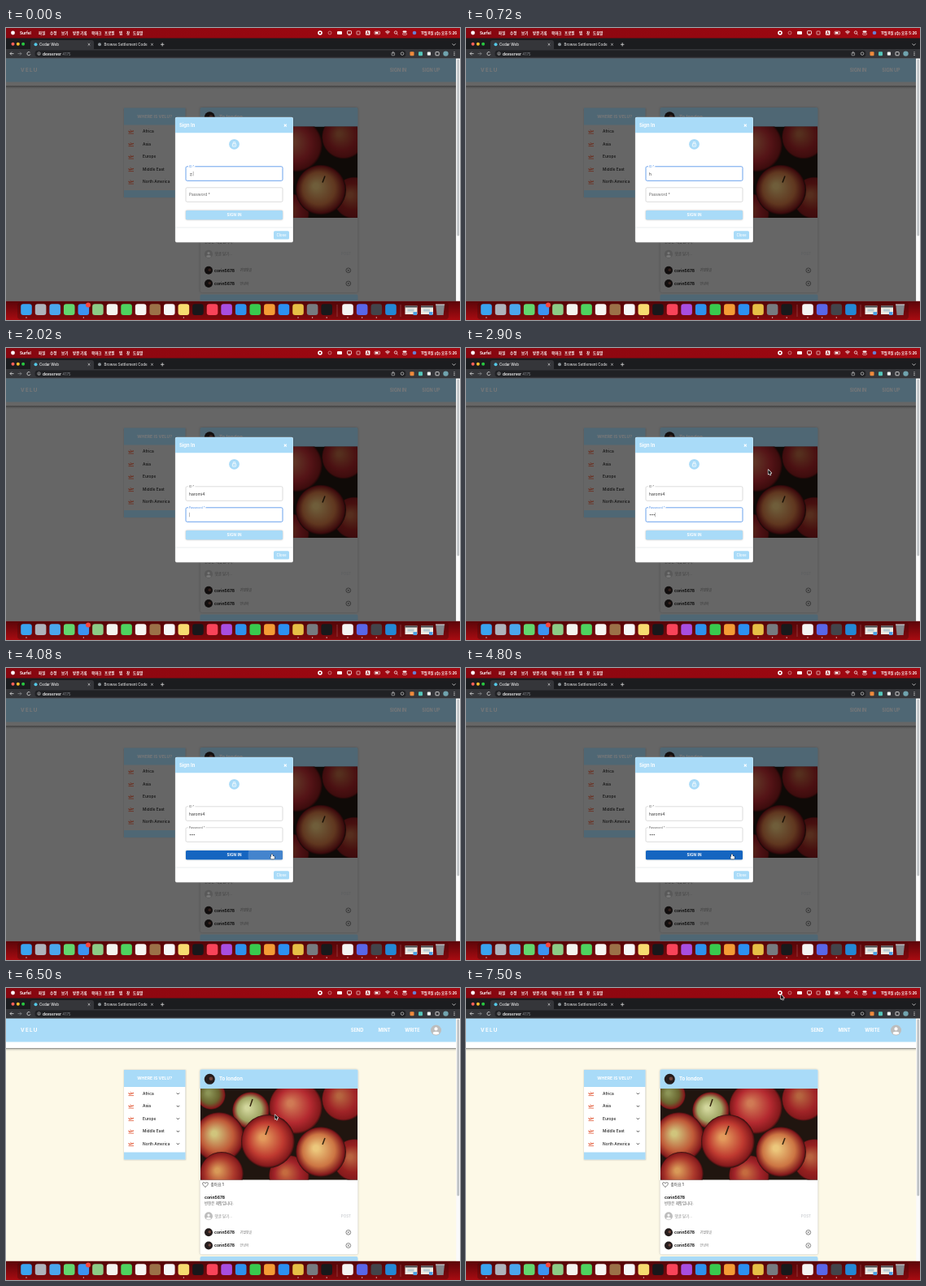
An HTML page with a canvas for the animation above (7.52 s loop, 558x360 px).

```html
<!DOCTYPE html>
<html lang="ko">
<head>
<meta charset="utf-8">
<title>Sign in</title>
<style>
html, body { margin: 0; width: 100%; height: 100%; overflow: hidden; background: #202124; }
canvas { display: block; width: 558px; height: 360px; }
</style>
</head>
<body>
<canvas id="stage"></canvas>
<script>
const W = 558, H = 360, LOOP = 7520;
const canvas = document.getElementById('stage');
const c = canvas.getContext('2d');
const scale = window.devicePixelRatio || 1;
canvas.width = W * scale;
canvas.height = H * scale;

const SKY = '#a9dbf8', FOCUS = '#5b98ea', INK = '#222';
const FONT = 'Inter, Roboto, "Noto Sans CJK KR", "Noto Sans CJK", sans-serif';
const LOGIN = 4960;
const USER = 'haromi4';
const USER_KEYS = [620, 860, 1000, 1150, 1300, 1450, 1680];
const PASS_KEYS = [2250, 2430, 2600, 2760];
const TAB_AT = 1860, CLICK = 3940;

// time, x, y
const PATH = [
  [2800, 372, 150], [2980, 371, 150], [3680, 327, 230], [4900, 327, 230],
  [5400, 306, 220], [6100, 306, 220], [7200, 387, 8], [LOOP, 387, 8]
];

const clamp = v => Math.max(0, Math.min(1, v));
const ease = v => { v = clamp(v); return v * v * (3 - 2 * v); };
const mix = (a, b, k) => `rgb(${a.map((v, i) => Math.round(v + (b[i] - v) * k))})`;

function rect(x, y, w, h, fill) {
  c.fillStyle = fill;
  c.fillRect(x, y, w, h);
}
function round(x, y, w, h, r, fill, stroke, lw = 0.6) {
  c.beginPath();
  c.roundRect(x, y, w, h, r);
  if (fill) { c.fillStyle = fill; c.fill(); }
  if (stroke) { c.strokeStyle = stroke; c.lineWidth = lw; c.stroke(); }
}
function disc(x, y, r, fill, stroke, lw = 0.7) {
  c.beginPath();
  c.arc(x, y, r, 0, 7);
  if (fill) { c.fillStyle = fill; c.fill(); }
  if (stroke) { c.strokeStyle = stroke; c.lineWidth = lw; c.stroke(); }
}
function line(color, lw, ...pts) {
  c.beginPath();
  for (let i = 0; i < pts.length; i += 2) c.lineTo(pts[i], pts[i + 1]);
  c.strokeStyle = color;
  c.lineWidth = lw;
  c.stroke();
}
function fade(x0, y0, x1, y1, ...colors) {
  const g = c.createLinearGradient(x0, y0, x1, y1);
  colors.forEach((f, i) => g.addColorStop(i / (colors.length - 1), f));
  return g;
}
function text(s, x, y, size, color, weight = 400, align = 'left', gap = 0) {
  c.font = `${weight} ${size}px ${FONT}`;
  c.letterSpacing = gap + 'px';
  c.textAlign = align;
  c.textBaseline = 'middle';
  c.fillStyle = color;
  c.fillText(s, x, y + 0.3);
}
function cross(x, y, r, color, lw = 0.7) {
  line(color, lw, x - r, y - r, x + r, y + r);
  line(color, lw, x + r, y - r, x - r, y + r);
}
function shadow(blur, color) {
  c.shadowBlur = blur * scale;
  c.shadowColor = color;
}
const noShadow = () => shadow(0, 'transparent');

function menuBar() {
  rect(0, 0, W, 13, fade(0, 0, W, 0, '#860710', '#a30811'));
  disc(8.5, 6, 2.4, '#fff');
  text('Surfel', 17, 6, 4.7, '#fff', 700);
  const items = [['파일', 40], ['수정', 54], ['보기', 68], ['방문 기록', 82], ['북마크', 105],
    ['프로필', 121], ['탭', 139], ['창', 148], ['도움말', 156]];
  for (const [s, x] of items) text(s, x, 6, 4.5, '#fff', 700);
  disc(386, 6, 2.8, '#fff');
  rect(385, 5, 2, 2, '#9a0811');
  disc(398, 6, 2, null, '#d9a0a0');
  round(407, 4, 6, 4, 1, '#fff');
  round(419.5, 3.6, 5, 4, 0.6, null, '#fff', 0.8);
  line('#fff', 0.8, 420.5, 8.8, 423.5, 8.8);
  round(431, 4, 4, 4, 0.6, null, '#fff');
  round(442, 3.3, 5.4, 5.4, 1, '#fff');
  text('A', 444.7, 6, 4.3, '#9a0811', 700, 'center');
  round(453, 4.2, 6.5, 3.6, 0.8, null, '#fff');
  rect(454, 5, 3.5, 2, '#fff');
  for (const r of [1.3, 2.8, 4.2]) {
    c.beginPath();
    c.arc(469, 8, r, -2.3, -0.85);
    c.strokeStyle = '#fff';
    c.lineWidth = 0.8;
    c.stroke();
  }
  disc(479, 5.5, 1.7, null, '#fff');
  line('#fff', 0.8, 480.2, 6.8, 481.6, 8.2);
  round(487.5, 3.6, 5, 2, 1, '#fff');
  round(487.5, 6.4, 5, 2, 1, null, '#fff');
  disc(502, 6, 2.3, '#6a7fd0');
  text('11월 8일 (수) 오후 5:26', 554, 6, 4.4, '#fff', 700, 'right');
}

function browser() {
  rect(0, 12.5, W, 14, '#1b1c1f');
  ['#ff5f57', '#febc2e', '#28c840'].forEach((f, i) => disc(8.5 + i * 6.3, 19.7, 2, f));
  round(30, 15, 78, 14, 3, '#35363a');
  rect(0, 26, W, 11.5, '#35363a');
  disc(36.5, 20.3, 2, '#54c8e6');
  text('Cedar Web', 41, 20.4, 4.5, '#eee', 500);
  cross(102, 20.3, 1.3, '#ddd');
  disc(115, 20.3, 2, '#8b9298');
  text('Browse Settlement Code', 120.5, 20.4, 4.5, '#ddd', 500);
  cross(179.5, 20.3, 1.3, '#ddd');
  line('#ddd', 0.8, 190, 20.3, 194.4, 20.3);
  line('#ddd', 0.8, 192.2, 18.1, 192.2, 22.5);
  line('#ddd', 0.8, 548.5, 19.5, 550.5, 21.3, 552.5, 19.5);

  round(35.5, 27.6, 456, 8.2, 4, '#202124');
  line('#ddd', 0.8, 9.5, 31.6, 5, 31.6);
  line('#ddd', 0.8, 7, 29.6, 5, 31.6, 7, 33.6);
  line('#87898d', 0.8, 14.5, 31.6, 19, 31.6);
  line('#87898d', 0.8, 17, 29.6, 19, 31.6, 17, 33.6);
  c.beginPath();
  c.arc(28, 31.6, 2.1, 0.3, 5.5);
  c.strokeStyle = '#ddd';
  c.lineWidth = 0.8;
  c.stroke();
  disc(40.5, 31.6, 1.8, null, '#bbb');
  rect(40.2, 31, 0.7, 1.7, '#bbb');
  text('devserver', 45, 31.8, 4.7, '#fff', 600);
  const w = c.measureText('devserver').width;
  text(':4175', 45 + w, 31.8, 4.7, '#8b8e93');
  round(474, 30.3, 3.6, 3.5, 0.5, null, '#ccc');
  line('#ccc', 0.7, 475.8, 32, 475.8, 28.8);
  disc(487, 31.6, 1.8, null, '#ccc');
  round(496.5, 29.2, 5, 5, 1, '#f08a3c');
  round(507, 29.2, 5, 5, 1, '#53c6ba');
  round(517.8, 29.6, 4.2, 4.2, 0.8, '#eee');
  round(528, 29.6, 4.2, 4.2, 0.6, null, '#eee', 0.8);
  disc(540.5, 31.6, 3.2, '#70a3ae');
  for (let i = -1; i < 2; i++) disc(551, 31.6 + i * 1.8, 0.55, '#eee');
}

function apple(x, y, r, light, mid) {
  const g = c.createRadialGradient(x - r * 0.2, y - r * 0.15, r * 0.1, x, y, r);
  g.addColorStop(0, light);
  g.addColorStop(0.6, mid);
  g.addColorStop(0.92, '#84191c');
  g.addColorStop(1, '#2a100d');
  disc(x, y, r, g);
}

function photo() {
  c.save();
  c.beginPath();
  c.rect(239, 124, 193, 112.5);
  c.clip();
  rect(239, 124, 193, 113, '#20150f');
  apple(415, 137, 27, '#b5643f', '#a02427');
  apple(252, 132, 18, '#8c9557', '#69652f');
  apple(356, 147, 33, '#d07a55', '#b42a30');
  apple(301, 151, 23, '#d2d69c', '#a0a564');
  apple(262, 184, 31, '#d0c47c', '#bf5a38');
  apple(428, 212, 26, '#b8623f', '#95201f');
  apple(265, 229, 27, '#d99a58', '#ad3a2c');
  apple(348, 231, 25, '#c56b3f', '#a2242a');
  apple(387, 202, 31, '#ecc77c', '#cc7543');
  apple(322, 189, 33, '#e39a5c', '#bf3a30');
  line('#34240f', 1.5, 300, 146, 303, 137);
  line('#34240f', 1.6, 319, 181, 323, 170);
  line('#34240f', 1.5, 389, 193, 392, 185);
  c.restore();
}

function avatar(x, y, r) {
  disc(x, y, r, '#251d1d');
  disc(x + r * 0.25, y - r * 0.1, r * 0.35, '#70463d');
}
function person(x, y, r) {
  disc(x, y, r, '#bdbdbd');
  disc(x, y - r * 0.25, r * 0.32, '#fff');
  c.beginPath();
  c.ellipse(x, y + r * 0.55, r * 0.58, r * 0.3, 0, 0, 7);
  c.fill();
}

function sidebar(paper) {
  shadow(1.5, 'rgba(0,0,0,.25)');
  rect(145, 101, 75.5, 110.5, paper);
  noShadow();
  rect(145, 101, 75.5, 21, SKY);
  rect(145, 202.5, 75.5, 9, SKY);
  text('WHERE IS VELU?', 182.7, 111.5, 5.2, '#fff', 700, 'center');
  ['Africa', 'Asia', 'Europe', 'Middle East', 'North America'].forEach((s, i) => {
    const y = 130.2 + i * 15.5;
    line('#e56a4c', 0.9, 150.5, y + 2.4, 157, y + 2.4);
    line('#e56a4c', 1.2, 150.5, y - 0.8, 152, y + 0.6, 157, y - 0.8);
    line('#e56a4c', 0.8, 154.6, y, 152.7, y - 2.3);
    text(s, 168, y, 4.8, INK, 500);
    line('#333', 0.9, 209.8, y - 0.8, 211.4, y + 0.8, 213, y - 0.8);
  });
}

function post(paper) {
  shadow(2, 'rgba(0,0,0,.3)');
  round(238.5, 100.5, 194, 228, 2, paper);
  noShadow();
  round(238.5, 100.5, 194, 24, [2, 2, 0, 0], SKY);
  avatar(250.3, 112.3, 6.5);
  text('To london', 262, 112.3, 6, '#fff', 700);
  photo();
  c.beginPath();
  c.moveTo(245, 245.5);
  c.bezierCurveTo(238.5, 240.6, 243.2, 237.8, 245, 241);
  c.bezierCurveTo(246.8, 237.8, 251.5, 240.6, 245, 245.5);
  c.strokeStyle = '#555';
  c.lineWidth = 0.8;
  c.stroke();
  text('좋아요 1', 251.5, 242.5, 4.7, '#333', 500);
  text('corin5678', 244, 258.3, 5, '#111', 700);
  text('반찬은 제맛입니다.', 244, 265.6, 4.5, '#555');
  person(249, 281.3, 5);
  text('댓글 달기...', 256.5, 281.3, 4.5, '#888');
  text('POST', 424, 281.3, 4.5, '#c4c8cc', 500, 'right');
  [['귀엽댓글', 301.3], ['안녕하', 317.5]].forEach(([s, y]) => {
    avatar(249, y, 5);
    text('corin5678', 256, y, 5, '#111', 700);
    text(s, 287.5, y, 4, '#777');
    disc(420.8, y, 2.9, null, '#555');
    cross(420.8, y, 1.2, '#555', 0.6);
  });
  round(238.5, 331, 194, 10, [2, 2, 0, 0], SKY);
}

function page(logged, dim) {
  const gray = [217, 217, 217];
  const paper = mix([255, 255, 255], gray, dim);
  c.save();
  c.beginPath();
  c.rect(0, 37.3, W, 299.5);
  c.clip();
  rect(0, 37, W, 301, mix([253, 249, 231], gray, dim));
  c.save();
  c.translate(0, -2.5 * dim);
  rect(0, 40, 553, 34.5, paper);
  rect(0, 74, 553, 4, fade(0, 74, 0, 78, 'rgba(40,40,40,.6)', 'rgba(80,80,80,.15)', 'rgba(80,80,80,0)'));
  sidebar(paper);
  post(paper);
  c.restore();
  rect(0, 37, 553, 29.5, SKY);
  text('VELU', 18, 52, 6.3, '#fff', 700, 'left', 1.2);
  if (logged) {
    text('SEND', 431.5, 52, 5.7, '#fff', 700, 'center');
    text('MINT', 465, 52, 5.7, '#fff', 700, 'center');
    text('WRITE', 499.5, 52, 5.7, '#fff', 700, 'center');
    person(528.5, 52, 6.5);
  } else {
    text('SIGN IN', 482, 52, 5.5, '#fff', 700, 'center');
    text('SIGN UP', 522.5, 52, 5.5, '#fff', 700, 'center');
  }
  if (dim > 0) rect(0, 37, 553, 301, `rgba(0,0,0,${0.53 * dim})`);
  rect(553.3, 37, 5, 301, '#fafafa');
  round(554.3, 38.5, 2.8, 218, 1.4, '#bfc3c6');
  c.restore();
}

function field(y, label, value, focused, floating, t) {
  round(221, y, 119, 17.5, 1.6, '#fff', focused ? FOCUS : '#c4c4c4', focused ? 0.9 : 0.6);
  const f = ease(floating);
  const size = 4.8 - 1.2 * f;
  if (f > 0) {
    c.font = `400 3.6px ${FONT}`;
    const w = c.measureText(label).width + 2;
    rect(224, y - 1, w * f, 2, '#fff');
  }
  text(label, 225, y + 8.7 * (1 - f), size, focused ? FOCUS : '#666');
  let end = 225.3;
  if (value === null) return;
  if (typeof value === 'number') {
    for (let i = 0; i < value; i++) disc(226.2 + i * 1.75, y + 8.8, 0.6, '#333');
    end += value * 1.75;
  } else {
    text(value, 225, y + 9, 5, '#333');
    end += c.measureText(value).width;
  }
  if (focused && t % 1000 < 600) rect(end, y + 6, 0.4, 5.5, '#555');
}

function button(t) {
  const hover = ease((t - 3600) / 220);
  shadow(2, 'rgba(0,0,0,.35)');
  round(221, 225, 119, 11.3, 1.5, SKY);
  noShadow();
  if (hover > 0) {
    c.save();
    c.globalAlpha *= hover;
    round(221, 225, 119, 11.3, 1.5, '#1565c0');
    c.restore();
  }
  if (t > CLICK) {
    c.save();
    c.beginPath();
    c.roundRect(221, 225, 119, 11.3, 1.5);
    c.clip();
    c.globalAlpha *= 1 - clamp((t - CLICK - 300) / 400);
    disc(327, 231, 112 * ease((t - CLICK) / 420), 'rgba(255,255,255,.2)');
    c.restore();
  }
  text('SIGN IN', 280.5, 230.7, 4.6, '#fff', 700, 'center', 0.15);
}

function modal(t, alpha) {
  c.save();
  c.globalAlpha = alpha;
  c.translate(0, -14 * (1 - alpha));
  round(207.8, 109.8, 145.2, 154.7, 2, '#fff', 'rgba(0,0,0,.3)');
  round(208, 110, 144.8, 19.3, [2, 2, 0, 0], SKY);
  text('Sign In', 213, 119.7, 5.8, '#fff', 700);
  cross(343.3, 120.2, 1.5, '#fff', 1.1);
  disc(280.5, 143.3, 6.4, SKY);
  round(278.4, 142.6, 4.2, 3.6, 0.5, null, '#fff', 0.8);
  line('#fff', 0.7, 279.3, 142.4, 279.3, 140.6, 281.7, 140.6, 281.7, 142.4);
  disc(280.5, 144.4, 0.5, '#fff');

  const onPass = t >= TAB_AT, clicked = t >= CLICK - 40;
  const count = keys => keys.filter(k => t >= k).length;
  const id = t < 430 ? 'ㅎ' : USER.slice(0, count(USER_KEYS));
  field(170.8, 'ID *', id, !onPass, 1, t);
  field(196.8, 'Password *', onPass ? count(PASS_KEYS) : null, onPass && !clicked,
    (t - TAB_AT) / 120, t - TAB_AT);
  button(t);
  line('#dee2e6', 0.6, 208, 246, 353, 246);
  round(329, 250.3, 19, 10.3, 1.5, SKY);
  text('Close', 338.5, 255.5, 4.5, '#fff', 500, 'center');
  c.restore();
}

const DOCK = ['#3aa3ee', '#aeb3bb', '#4ba7ec', '#62d66d', '#3c94f2', '#8ccb86', '#f4f2ee', '#4ed35f',
  '#f7f4f2', '#9b7148', '#f6f6f6', '#f7dc70', '#17171a', '#f84459', '#a84ee0', '#2d91ee',
  '#39c94d', '#f49b35', '#2b8ff2', '#e7bf45', '#777b80', '#18191b'];
const EXTRA = ['#f4f4f2', '#5966e8', '#43444a', '#2388d5'];

function dockIcon(x, color, running) {
  round(x - 6.8, 340.3, 13.6, 13.6, 3.2, color);
  if (running) disc(x, 357, 0.7, '#e9c9c9');
}
function dock() {
  rect(0, 336.8, W, 24, fade(0, 337, 0, H, '#5c0509', '#a80b11'));
  round(14, 338.2, 530, 21, 4, 'rgba(60,6,8,.35)');
  DOCK.forEach((f, i) => dockIcon(25 + i * 17.58, f, [0, 4, 11, 19, 20, 21].includes(i)));
  disc(101, 341.5, 3, '#f5453d');
  EXTRA.forEach((f, i) => dockIcon(420 + i * 17.65, f, true));
  line('#a5565a', 0.6, 407, 341, 407, 356);
  line('#a5565a', 0.6, 485, 341, 485, 356);
  for (const x of [490.5, 510]) {
    rect(x, 342.5, 15, 10.5, '#eceae2');
    rect(x, 342.5, 15, 2, '#45474c');
    rect(x + 3, 346.5, 8, 3, '#b9cbd2');
    rect(x + 10, 350, 4.5, 4, '#4d9fe5');
  }
  c.beginPath();
  c.moveTo(528.2, 341);
  c.lineTo(539, 341);
  c.lineTo(537.6, 354);
  c.lineTo(529.6, 354);
  c.fillStyle = '#85878b';
  c.fill();
  line('#dcdde0', 1, 528, 341, 539.2, 341);
}

function cursorAt(t) {
  for (let i = 1; i < PATH.length; i++) {
    const [t0, x0, y0] = PATH[i - 1], [t1, x1, y1] = PATH[i];
    if (t < t0 || t > t1) continue;
    const k = ease((t - t0) / (t1 - t0));
    return [x0 + (x1 - x0) * k, y0 + (y1 - y0) * k];
  }
  return null;
}
function cursor(t) {
  const p = cursorAt(t);
  if (!p) return;
  const [x, y] = p;
  const hand = t < LOGIN + 120 && x > 221 && x < 340 && y > 225 && y < 237;
  c.save();
  c.translate(x, y);
  c.lineJoin = 'round';
  c.beginPath();
  if (hand) {
    c.roundRect(-0.9, -0.5, 1.7, 5, 0.8);
    c.roundRect(-1.7, 2, 4.8, 3.6, 1.2);
    c.strokeStyle = '#111';
    c.lineWidth = 0.9;
    c.stroke();
    c.fillStyle = '#fff';
  } else {
    const pts = [0, 0, 0, 5.8, 1.3, 4.7, 2.2, 6.8, 3.2, 6.4, 2.3, 4.3, 4.1, 4.2];
    for (let i = 0; i < pts.length; i += 2) c.lineTo(pts[i], pts[i + 1]);
    c.closePath();
    c.strokeStyle = '#fff';
    c.lineWidth = 1.1;
    c.stroke();
    c.fillStyle = '#111';
  }
  c.fill();
  c.restore();
}

function draw(t) {
  c.setTransform(scale, 0, 0, scale, 0, 0);
  const open = 1 - ease((t - LOGIN) / 260);
  page(t >= LOGIN, open);
  if (open > 0) modal(t, open);
  menuBar();
  browser();
  dock();
  cursor(t);
}

const start = performance.now();
function tick() {
  draw((performance.now() - start) % LOOP);
  requestAnimationFrame(tick);
}
tick();
</script>
</body>
</html>
```
